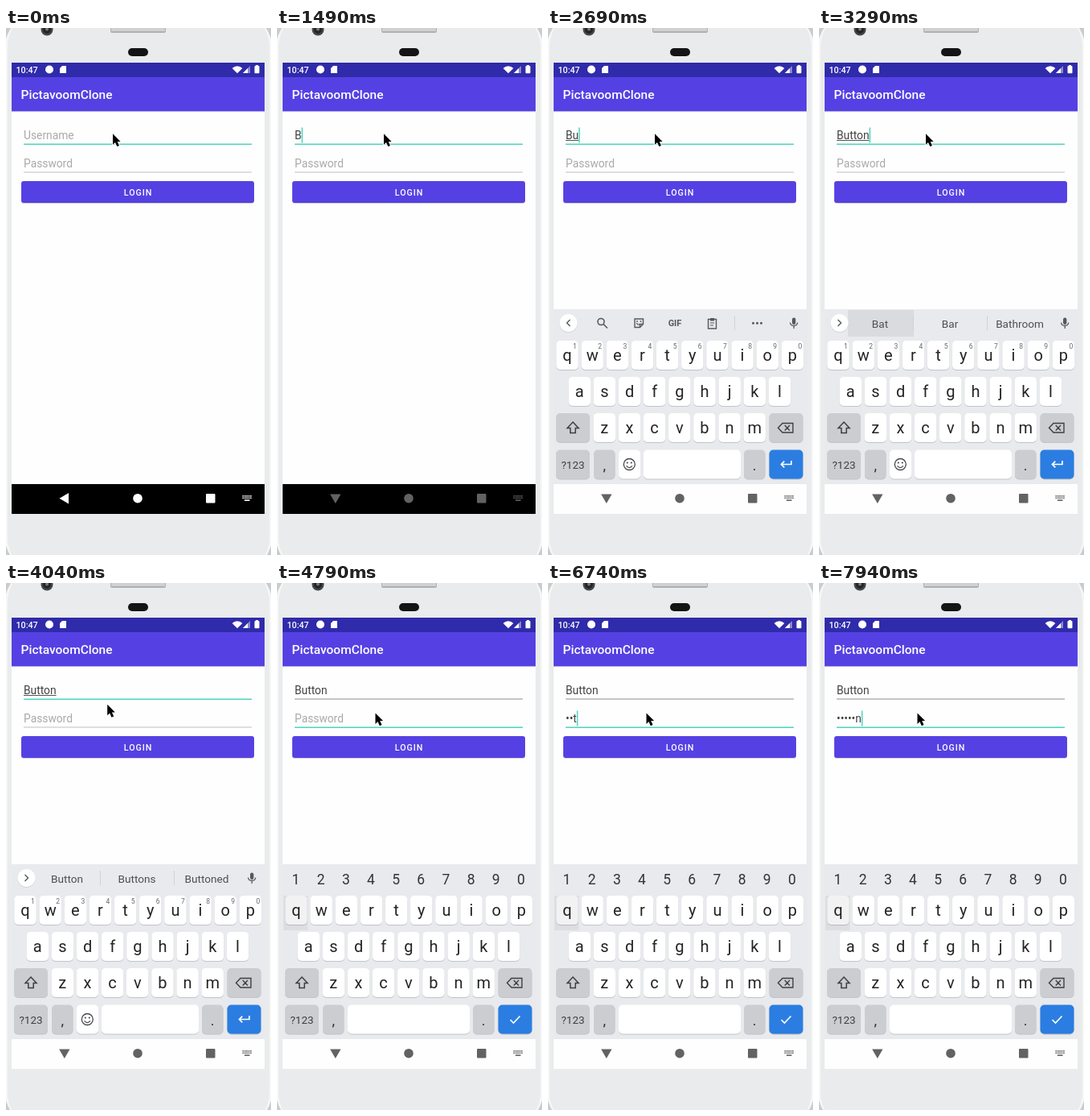
These frames come from a looping animation (330 px wide and 654 px high, 8000 ms). An HTML page with a canvas:

```html
<!DOCTYPE html>
<html lang="en">
<head>
<meta charset="utf-8">
<title>Login on a phone</title>
<style>
html, body { margin: 0; width: 100%; height: 100%; overflow: hidden; background: #e9ebec; }
canvas { display: block; width: 330px; height: 654px; }
</style>
</head>
<body>
<canvas id="stage"></canvas>
<script>
const W = 330, H = 654, LOOP = 8000;
const TEAL = '#4fd3bd', VIOLET = '#5541e3', ICON = '#55585d', TEXT = '#424242';
const USER = 'Button';
const canvas = document.getElementById('stage');
const ctx = canvas.getContext('2d');
const ratio = window.devicePixelRatio || 1;
canvas.width = W * ratio;
canvas.height = H * ratio;

const clamp = v => Math.max(0, Math.min(1, v));
const smooth = v => v * v * (3 - 2 * v);
const within = (t, a, b) => t >= a && t < b;
const countPast = (t, times) => times.filter(x => t >= x).length;

function rect(x, y, w, h, fill) {
  ctx.fillStyle = fill;
  ctx.fillRect(x, y, w, h);
}
function round(x, y, w, h, r, fill) {
  ctx.beginPath();
  ctx.roundRect(x, y, w, h, r);
  ctx.fillStyle = fill;
  ctx.fill();
}
function disc(x, y, r, fill) {
  ctx.beginPath();
  ctx.arc(x, y, r, 0, 7);
  ctx.fillStyle = fill;
  ctx.fill();
}
function shape(points, fill) {
  ctx.beginPath();
  points.forEach(p => ctx.lineTo(p[0], p[1]));
  ctx.closePath();
  ctx.fillStyle = fill;
  ctx.fill();
}
function stroke(d, color, width = 1.4) {
  ctx.strokeStyle = color;
  ctx.lineWidth = width;
  ctx.stroke(new Path2D(d));
}
function text(str, x, y, size, color, weight = 400, align = 'left', spacing = 0) {
  ctx.font = `${weight} ${size}px Roboto, sans-serif`;
  ctx.letterSpacing = spacing + 'px';
  ctx.textAlign = align;
  ctx.fillStyle = color;
  ctx.fillText(str, x, y);
  const width = ctx.measureText(str).width;
  ctx.letterSpacing = '0px';
  return width;
}

function drawPhone() {
  rect(0, 0, W, H, '#c9cbcd');
  round(-2, -24, 334, 704, 52, '#f5f6f6');
  round(2, -24, 326, 704, 48, '#e9ebec');
  disc(51, 2, 7.5, '#444648');
  disc(51, 2, 5, '#242527');
  disc(51, 1.5, 2, '#75787b');
  round(130, -6, 69, 12, 2, '#aeb0b2');
  rect(131, 0, 67, 4, '#cfd1d3');
  round(152, 25, 25, 10, 5, '#141414');
}

function drawStatus() {
  rect(7, 43, 315, 18, '#2f2baa');
  text('10:47', 12.5, 56, 10.7, '#fff', 500);
  disc(54, 51.5, 5, '#fff');
  shape([[70, 47], [75, 47], [75, 56], [67, 56], [67, 50]], '#fff');
  ctx.beginPath();
  ctx.moveTo(288, 56.3);
  ctx.arc(288, 56.3, 9, -Math.PI * 0.75, -Math.PI * 0.25);
  ctx.fillStyle = '#fff';
  ctx.fill();
  shape([[295, 56], [304, 56], [304, 47]], 'rgba(255,255,255,.45)');
  shape([[295, 56], [301, 56], [301, 50]], '#fff');
  round(309.5, 47, 6, 9.2, 1, '#fff');
  rect(311, 46, 3, 2, '#fff');
}

function drawField(value, hint, base, focused, caret, composing) {
  let end = 22;
  if (value) end += text(value, 22, base, 13.8, TEXT);
  else text(hint, 22, base, 13.8, '#a9a9a9');
  if (composing) rect(22, base + 1, end - 22, 1, '#555');
  const line = focused ? TEAL : value ? '#8d8d8d' : '#c3bfbf';
  rect(22, base + 5.5, 284, focused ? 1.5 : 1, line);
  if (caret) rect(end, base - 14.5, 1.5, 19, TEAL);
}

function drawApp(s) {
  rect(7, 61, 315, 505, '#fefefe');
  rect(7, 103, 315, 1, '#d8d6e8');
  rect(7, 61, 315, 42.3, VIOLET);
  text('PictavoomClone', 18.5, 88, 15.5, '#fff', 500);
  drawField(s.user, 'Username', 138, !s.onPassword, s.userCaret, s.composing);
  drawField(s.password, 'Password', 173, s.onPassword, s.passCaret, false);
  round(19, 191, 290, 27, 3, 'rgba(0,0,0,.16)');
  round(19, 190, 290, 27, 3, VIOLET);
  text('LOGIN', 164.5, 207.5, 10.7, '#fff', 500, 'center', 0.95);
}

function drawNav(s) {
  rect(7, 566, 315, 37, s.keyboard ? '#fefefe' : '#000');
  const level = Math.round(255 - 157 * s.dim);
  const color = `rgb(${level},${level},${level})`;
  ctx.save();
  ctx.translate(72.8, 583.7);
  ctx.rotate(-s.turn * Math.PI / 2);
  shape([[-6.3, 0], [5.2, -6.7], [5.2, 6.7]], color);
  ctx.restore();
  disc(164, 583.7, 5.8, color);
  round(249, 578, 11.5, 11.5, 1, color);
  for (let row = 0; row < 2; row++)
    for (let col = 0; col < 5; col++) rect(294.5 + col * 2.4, 580 + row * 2.5, 1.6, 1.6, color);
  rect(297, 585.3, 6.5, 1.6, color);
}

function drawKey(x, y, w, fill = '#fff') {
  round(x, y + 1, w, 36, 5, '#c2c4c8');
  round(x, y, w, 36, 5, fill);
}
function drawLetters(letters, x, y, digits) {
  [...letters].forEach((letter, i) => {
    const cx = x + i * 31.15;
    drawKey(cx - 13.7, y, 27.4);
    text(letter, cx, y + 24.5, 20, '#242424', 400, 'center');
    if (digits) text((i + 1) % 10, cx + 9.5, y + 9.5, 8.5, '#63666a', 400, 'center');
  });
}

function drawMic(color) {
  round(304, 359.5, 4.4, 8.5, 2.2, color);
  stroke('M301.5 365.5 A4.7 4.7 0 0 0 310.8 365.5 M306.2 370 V373', color, 1.3);
}
function drawChevron(open) {
  disc(25.5, 366.8, 11.2, '#d3d5d8');
  disc(25.5, 366, 11, '#fff');
  stroke(open ? 'M23.5 362 L27.5 366 L23.5 370' : 'M27.5 362 L23.5 366 L27.5 370', ICON);
}
function drawTools() {
  drawChevron(false);
  stroke('M70 364.5 A4 4 0 1 1 62 364.5 A4 4 0 1 1 70 364.5 M69 367.5 L74 372.5', ICON, 1.6);
  stroke('M108 361 H118.5 V367.5 L114.5 371.5 H108 Z M118 367.5 H114.5 V371', ICON, 1.4);
  stroke('M110.3 366 Q111.5 369 114 367.5', ICON, 1.1);
  disc(111, 364, 0.9, ICON);
  disc(115.5, 364, 0.9, ICON);
  text('GIF', 158, 370, 11, ICON, 700, 'center');
  stroke('M199.5 361.5 H209.5 V373 H199.5 Z', ICON, 1.4);
  rect(202, 360, 5, 3.5, ICON);
  stroke('M201.8 366 H207.2 M201.8 369 H206', ICON, 1.1);
  rect(232, 357, 1, 18, '#d0d2d5');
  [255.5, 260.5, 265.5].forEach(x => disc(x, 366.3, 1.5, ICON));
}
function drawSuggestions(words, pressed) {
  if (pressed) rect(36, 350, 82, 33, '#d9dbde');
  drawChevron(true);
  words.forEach((word, i) => text(word, 76 + i * 87, 371.5, 13.6, '#4c4f54', 400, 'center'));
  [117, 209].forEach(x => rect(x, 357, 1, 18, '#d0d2d5'));
}

function drawKeyboard(s) {
  const special = '#cbcdd1';
  rect(7, 349, 315, 217, '#e8eaed');
  if (s.digits) {
    for (let i = 0; i < 10; i++)
      text((i + 1) % 10, 23.5 + i * 31.15, 373.8, 17.5, '#333', 400, 'center');
  } else {
    if (s.words) drawSuggestions(s.words, s.pressed);
    else drawTools();
    drawMic(s.onPassword ? '#bfc1c5' : ICON);
  }
  drawLetters('qwertyuiop', 24, 388, !s.digits);
  drawLetters('asdfghjkl', 39.3, 433);
  drawLetters('zxcvbnm', 70.3, 478);
  if (s.digits) rect(8, 388, 30.5, 43, 'rgba(0,0,0,.05)');

  drawKey(10, 478, 42, special);
  stroke('M31 489 L38 496.5 H34.2 V502.5 H27.8 V496.5 H24 Z', '#3c3f43', 1.5);
  drawKey(275.5, 478, 42, special);
  stroke('M292 490.5 H305 V502 H292 L286.5 496.2 Z M294.8 493 L301 499.4 M301 493 L294.8 499.4', '#3c3f43', 1.4);

  drawKey(10, 523.5, 42, special);
  text('?123', 31, 546.5, 13.5, '#3c3f43', 400, 'center');
  drawKey(57, 523.5, 26.5, special);
  text(',', 70.2, 549, 18, '#333', 400, 'center');
  if (s.digits) drawKey(88, 523.5, 152);
  else {
    drawKey(88, 523.5, 27);
    stroke('M108.3 541.5 A7 7 0 1 1 94.3 541.5 A7 7 0 1 1 108.3 541.5 M97.5 543.3 Q101.3 547.8 105 543.3', '#44474b', 1.3);
    disc(98.8, 539.5, 1.1, '#44474b');
    disc(103.8, 539.5, 1.1, '#44474b');
    drawKey(119, 523.5, 121);
  }
  drawKey(244, 523.5, 26.5, special);
  text('.', 257.2, 549, 18, '#333', 400, 'center');
  drawKey(275.5, 523.5, 42, '#2b7de1');
  stroke(s.digits
    ? 'M290.5 542 L294.5 546 L302.5 537.5'
    : 'M303 537 V541.5 H290.5 M294.3 537.7 L290.5 541.5 L294.3 545.3', '#fff', 1.7);
}

function drawPointer(x, y) {
  const arrow = 'M0 0 V13.4 L3 10.6 L5.3 15.8 L8 14.6 L5.7 9.6 H9.6 Z';
  ctx.save();
  ctx.translate(x, y);
  stroke(arrow, '#fff', 2);
  ctx.fillStyle = '#000';
  ctx.fill(new Path2D(arrow));
  ctx.restore();
}

function stateAt(t) {
  const typed = countPast(t, [1340, 2690, 2840, 2990, 3140, 3290]);
  const hidden = countPast(t, [5090, 6440, 6740, 7490, 7790, 7940]);
  const onPassword = t >= 4490;
  const blinkOff = within(t, 1790, 2240) || within(t, 3740, 4240);
  let words = null;
  if (within(t, 2840, 3440)) words = ['Bat', 'Bar', 'Bathroom'];
  else if (within(t, 3440, 4490)) words = [USER, USER + 's', USER + 'ed'];
  return {
    user: USER.slice(0, typed),
    password: hidden ? '•'.repeat(hidden - 1) + USER.toLowerCase()[hidden - 1] : '',
    onPassword,
    userCaret: within(t, 450, 890) || (within(t, 1340, 4490) && !blinkOff),
    passCaret: onPassword && !within(t, 4790, 5090) && !within(t, 5690, 6140) && !within(t, 7190, 7490),
    composing: typed > 1 && !onPassword,
    turn: smooth(clamp((t - 400) / 350)),
    dim: t < 1190 ? 0 : clamp((t - 1090) / 400),
    keyboard: t >= 1790,
    digits: t >= 4790,
    words,
    pressed: within(t, 2990, 3440),
    move: smooth(clamp((Math.floor((t - 3740) / 150) + 1) / 5))
  };
}

function draw(t) {
  const s = stateAt(t);
  ctx.setTransform(ratio, 0, 0, ratio, 0, 0);
  drawPhone();
  drawApp(s);
  drawStatus();
  if (s.keyboard) drawKeyboard(s);
  drawNav(s);
  drawPointer(133 - 10.5 * s.move, 131.3 + 30.2 * s.move);
}

const start = performance.now();
function tick() {
  draw((performance.now() - start) % LOOP);
  requestAnimationFrame(tick);
}
tick();
</script>
</body>
</html>
```
